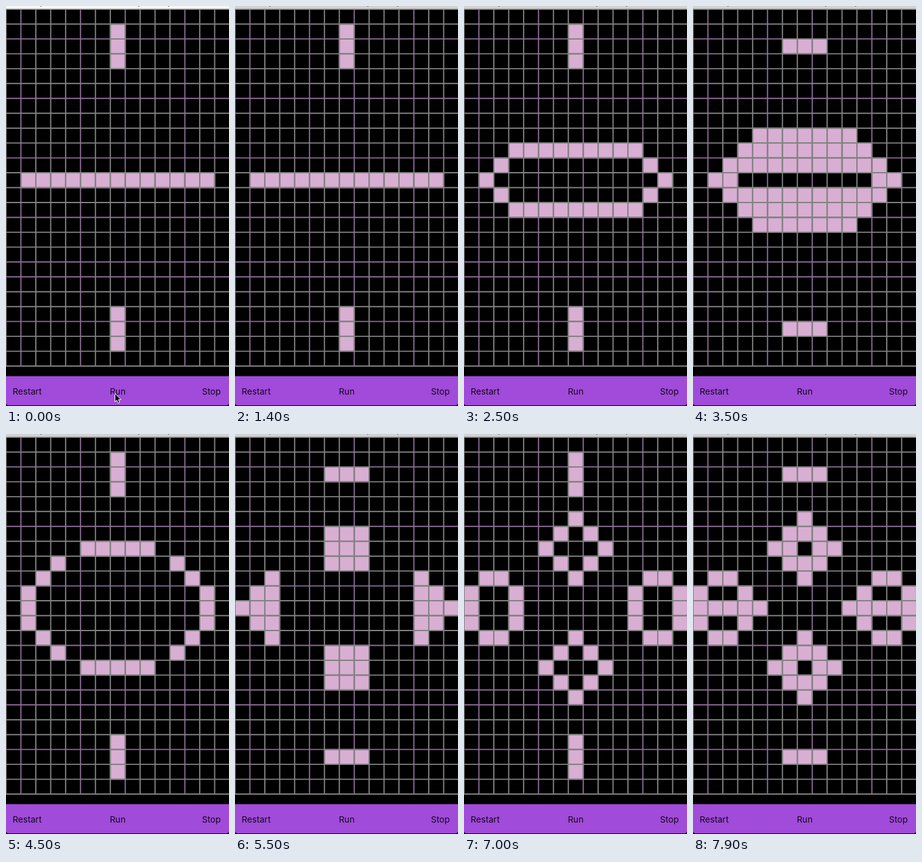
Animation of 351x631 px, one loop 8000 ms. Source, as an HTML page with a canvas:

```html
<!DOCTYPE html>
<html lang="en">
<head>
<meta charset="utf-8">
<title>Game of Life</title>
<style>
  html, body { margin: 0; width: 100%; height: 100%; overflow: hidden; background: #000; }
  canvas, svg { position: absolute; left: 0; top: 0; display: block; }
  text { font: 13.6px Inter, "Noto Sans", sans-serif; fill: #14061c; }
</style>
</head>
<body>
<canvas id="board" width="351" height="631"></canvas>
<svg width="351" height="631" viewBox="0 0 351 631">
  <rect id="title" width="351" height="4.4"/>
  <path id="marks" d="M54 0h2M208 0h2M255 0h2" stroke="#777" stroke-width="2"/>
  <path d="M0 584H351V626Q351 630 347 630H4Q0 630 0 626Z" fill="#a04bd9"/>
  <text x="10.5" y="612.5">Restart</text>
  <text x="175.8" y="612.5" text-anchor="middle">Run</text>
  <text x="338" y="612.5" text-anchor="end">Stop</text>
  <path id="cursor" d="M0 0V13.5L3 10.8 5 15.5 7.4 14.5 5.4 9.9H9.6Z" fill="#000" stroke="#fff"/>
</svg>
<script>
const LOOP = 8000, COLS = 15, ROWS = 24, SIZE = 23.46, TOP = 5;
const FIRST_STEP = 1500, STEP = 1000;
const GRAY = '#828282', PURPLE = '#8c6d96';
const purpleRows = [2, 6, 10, 14, 17, 18, 21], purpleCols = [1, 5, 8, 12];
const $ = id => document.getElementById(id);
const ctx = $('board').getContext('2d');

const grid = alive => Array.from({ length: ROWS }, (_, r) =>
  Array.from({ length: COLS }, (_, c) => alive(r, c)));

function next(cells) {
  return grid((r, c) => {
    let n = 0;
    for (let y = r - 1; y <= r + 1; y++)
      for (let x = c - 1; x <= c + 1; x++)
        if ((y !== r || x !== c) && cells[y]?.[x]) n++;
    return n === 3 || (n === 2 && cells[r][c]);
  });
}

// A long bar across the middle with a blinker above and below
const generations = [grid((r, c) =>
  (r === 11 && c >= 1 && c <= 13) ||
  (c === 7 && ((r >= 1 && r <= 3) || (r >= 20 && r <= 22))))];
while (generations.length < 8) generations.push(next(generations.at(-1)));

function line(x1, y1, x2, y2, color) {
  ctx.strokeStyle = color;
  ctx.beginPath();
  ctx.moveTo(x1, y1);
  ctx.lineTo(x2, y2);
  ctx.stroke();
}

function drawBoard(cells) {
  const bottom = TOP + ROWS * SIZE;
  ctx.fillStyle = '#000';
  ctx.fillRect(0, 0, 351, 631);
  ctx.fillStyle = '#d9aed3';
  cells.forEach((row, r) => row.forEach((on, c) => {
    if (on) ctx.fillRect(c * SIZE, TOP + r * SIZE, SIZE, SIZE);
  }));
  ctx.lineWidth = 1.9;
  for (let c = 0; c <= COLS; c++)
    line(c * SIZE, TOP, c * SIZE, bottom, purpleCols.includes(c) ? PURPLE : GRAY);
  for (let r = 0; r <= ROWS; r++) {
    const y = TOP + r * SIZE;
    line(0, y, 351, y, purpleRows.includes(r) ? PURPLE : GRAY);
  }
  // Live cells keep plain gray borders
  ctx.strokeStyle = GRAY;
  cells.forEach((row, r) => row.forEach((on, c) => {
    if (on) ctx.strokeRect(c * SIZE, TOP + r * SIZE, SIZE, SIZE);
  }));
}

function frame(now) {
  const t = now % LOOP;
  const gen = Math.max(0, Math.floor((t - FIRST_STEP) / STEP) + 1);
  drawBoard(generations[gen]);
  $('title').setAttribute('fill', t < 300 ? '#f6f6f6' : '#d2d2d2');
  // The pointer clicks Run, then leaves through the bottom edge
  const leave = Math.min(1, Math.max(0, (t - 600) / 300));
  $('cursor').setAttribute('transform', `translate(171.5 ${611 + 22 * leave * leave})`);
  requestAnimationFrame(frame);
}
requestAnimationFrame(frame);
</script>
</body>
</html>
```
